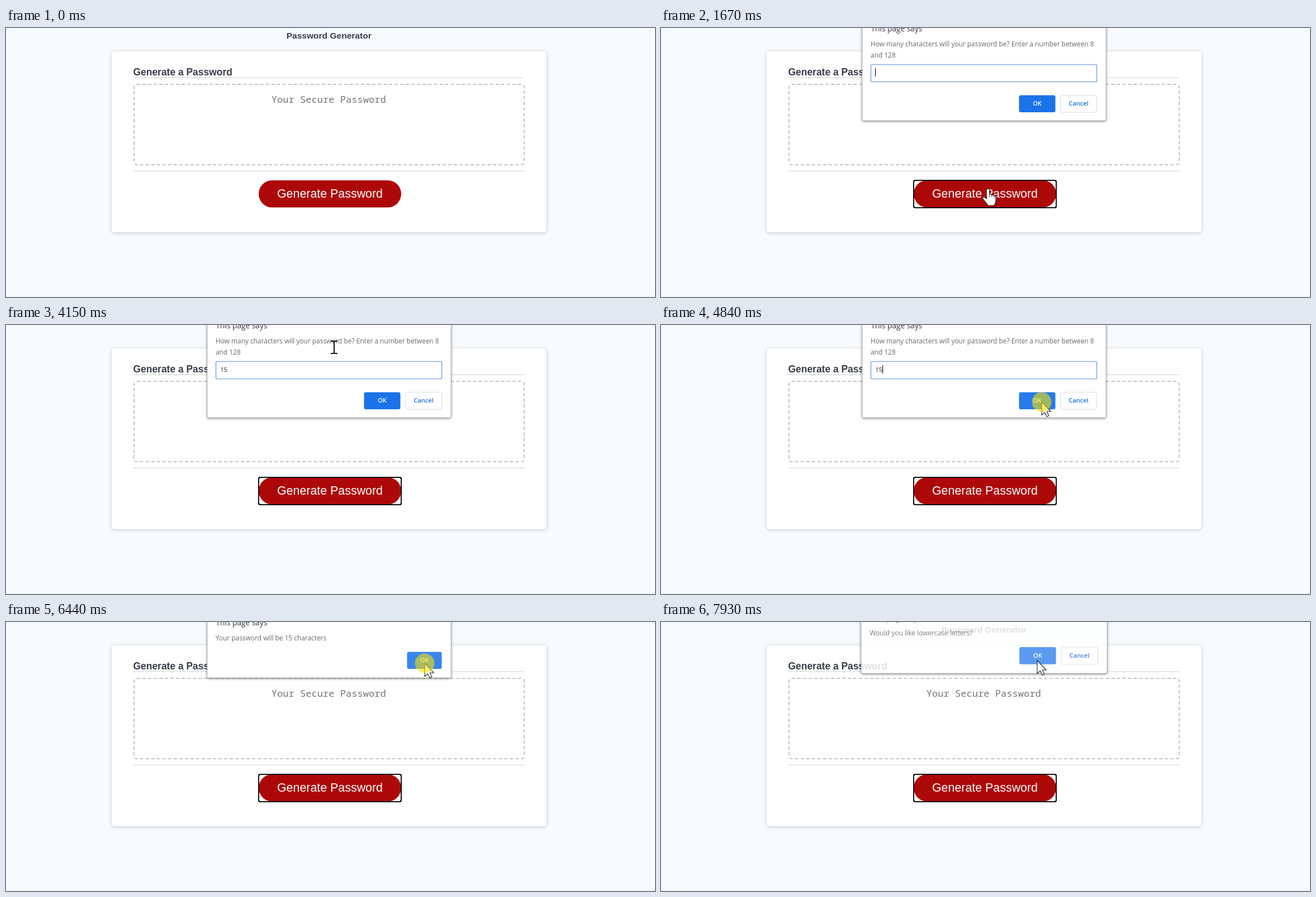
Recreate the animation shown at these times as an HTML page. Size 1161 by 482 pixels, loop 8 s.

```html
<!DOCTYPE html>
<html lang="en">
<head>
<meta charset="utf-8">
<title>Password Generator</title>
<style>
  html, body { margin: 0; width: 100%; height: 100%; overflow: hidden; }
  body { position: relative; background: #f8fbfe; font-family: "Liberation Sans", Arial, sans-serif; }
  .card {
    position: absolute; left: 189px; top: 42px; width: 778px; height: 324px;
    background: #fff; border-radius: 5px; box-shadow: 0 1px 6px rgba(0, 0, 0, .22);
  }
  .rule { position: absolute; left: 228px; width: 700px; height: 2px; background: #e6e7ea; }
  .field {
    position: absolute; left: 228px; top: 100px; width: 700px; height: 146px;
    box-sizing: border-box; border: 2px dashed #c3c4cc; border-radius: 6px;
  }
  .floor { position: absolute; left: 0; top: 481px; width: 100%; height: 1px; background: #eceef0; }
  svg { position: absolute; left: 0; top: 0; display: block; }
  .head { font-weight: bold; fill: #373d49; }
  .mono { font: 17.08px "Noto Sans Mono", "DejaVu Sans Mono", monospace; fill: #757575; }
  .ui { font: 11.9px "Open Sans", "Noto Sans", sans-serif; fill: #64686d; }
  .ui.title { font-size: 13.7px; fill: #35373a; }
  .ui.value { font-size: 10.8px; fill: #222; }
  .ui.label { font-size: 11px; font-weight: 600; text-anchor: middle; }
  .panel { fill: #fff; stroke: #b4b4b4; stroke-width: .8; filter: drop-shadow(0 1px 2px rgba(0, 0, 0, .5)); }
</style>
</head>
<body>
<div class="card"></div>
<div class="rule" style="top:88px"></div>
<div class="field"></div>
<div class="rule" style="top:255px"></div>
<div class="floor"></div>
<svg id="stage" width="1161" height="482" viewBox="0 0 1161 482">
  <text class="head" x="577.7" y="19" font-size="15.55" text-anchor="middle">Password Generator</text>
  <text class="head" x="227.5" y="85" font-size="17.45">Generate a Password</text>
  <text class="mono" x="474.8" y="134">Your Secure Password</text>
  <rect id="ring" x="452" y="273" width="255" height="49" rx="3" fill="#fff" stroke="#101010" stroke-width="2"/>
  <rect x="452" y="273" width="255" height="48.5" rx="24.2" fill="#ad0808"/>
  <text x="579.5" y="304" font-size="21.4" text-anchor="middle" fill="#fff">Generate Password</text>
  <rect id="edge" x="452" y="273" width="255" height="49" rx="3" fill="none" stroke="#101010" stroke-width="2"/>
  <g id="dialogs"></g>
  <g id="cursor" stroke-linejoin="round">
    <path id="arrow" d="M0 0V23.5L5.4 18.6L9 26.3L12.8 24.6L9.3 17H16.2Z" fill="#fff" stroke="#222" stroke-width="1.1"/>
    <g id="hand" fill="#fff" stroke="#222" stroke-width="1.2">
      <path d="M-2.6 2Q-2.4 0 0 0Q2.4 0 2.6 2V10Q6 8.8 7 11.3Q10 10.2 11 12.8Q14 12.3 14 15.5V21Q14 26 10.5 30H0Q-3 26 -6 22L-9.6 17.5Q-9 14 -6 15L-2.6 18Z"/>
      <path d="M2.6 10V15M7 11.3V15.5M11 12.8V16.5" stroke-width=".9"/>
    </g>
    <path id="beam" d="M-6 -11H-2Q0 -11 0 -9Q0 -11 2 -11H6M0 -9V9M-6 11H-2Q0 11 0 9Q0 11 2 11H6" fill="none" stroke="#111" stroke-width="2"/>
    <circle id="click" r="17.5" fill="#f0e10a"/>
  </g>
</svg>
<script>
const LOOP = 8000;
const $ = id => document.getElementById(id);
const show = (el, on) => el.setAttribute('visibility', on ? 'visible' : 'hidden');

const text = (cls, x, y, str, fill) =>
  `<text class="ui ${cls}" x="${x}" y="${y}"${fill ? ` style="fill:${fill}"` : ''}>${str}</text>`;

const button = (name, x, y, w) => {
  const ok = name === 'OK';
  return `<rect class="${name}" x="${x + .5}" y="${y + .5}" width="${w - 1}" height="30.5" rx="3" stroke="${ok ? 'none' : '#dadce0'}"/>`
    + text('label', x + w / 2, y + 19, name, ok ? '#fff' : '#1a6fd6');
};

// Each dialog hangs from the top edge of the stage.
const specs = {
  prompt: { h: 166, row: 120, ok: 640, cancel: true, idle: '#1a73e8', hover: '#267aec',
    lines: ['How many characters will your password be? Enter a number between 8', 'and 128'] },
  alert: { h: 100, row: 53, ok: 717, lines: ['Your password will be 15 characters'] },
  upper: { h: 100, row: 53, ok: 640, cancel: true, lines: ['Would you like uppercase letters?'] },
  lower: { h: 100, row: 53, ok: 640, cancel: true, lines: ['Would you like lowercase letters?'] }
};

$('dialogs').innerHTML = Object.entries(specs).map(([id, s]) => {
  s.okWidth = s.cancel ? 66 : 63;
  return `<g id="${id}"><rect class="panel" x="360" y="-40" width="436" height="${s.h + 40}" rx="2"/>`
    + text('title', 375.5, 6, 'This page says')
    + s.lines.map((l, i) => text('', 375, 33 + i * 19.5, l)).join('')
    + (id === 'prompt'
      ? '<rect x="375.5" y="65.5" width="404" height="31" rx="2" fill="#fff" stroke="#86aee6" stroke-width="1.7"/>'
        + '<text id="value" class="ui value" x="383.5" y="84"></text>'
        + '<rect id="caret" y="72" width="1.2" height="15" fill="#111"/>'
      : '')
    + button('OK', s.ok, s.row, s.okWidth)
    + (s.cancel ? button('Cancel', 714, s.row, 66) : '') + '</g>';
}).join('');

// Time, then the opacity of each dialog on view.
const scenes = [
  [0, {}],
  [1515, { prompt: .35 }], [1590, { prompt: .75 }], [1670, { prompt: 1 }],
  [4920, { prompt: .6 }], [5000, { prompt: .4, alert: .65 }], [5080, { alert: 1 }],
  [6530, { alert: .6 }], [6605, { alert: .4, upper: .65 }], [6680, { upper: 1 }],
  [7850, { upper: .6 }], [7930, { upper: .5, lower: .7 }]
];

const carets = [[0, 0], [1590, 383], [1980, 0], [2510, 383], [3060, 0], [3370, 390], [3520, 396], [4070, 0], [4600, 396]];
const values = [[0, ''], [3370, '1'], [3520, '15']];
const clicks = [[0, 0], [1360, .6], [1437, .3], [1515, 0], [4760, .6], [4920, .3], [5000, 0],
  [6300, .6], [6455, .3], [6530, 0], [7620, .6], [7775, .3], [7850, 0]];

const easeOut = u => 1 - (1 - u) ** 3;
const smooth = u => u * u * (3 - 2 * u);

// Start, end, number of steps, cubic path, easing.
const moves = [
  [280, 980, 9, [[1010, 442], [868, 391], [727, 340], [585, 288]], easeOut],
  [1980, 2360, 5, [[588, 297], [662, 223], [660, 138], [579, 48]], smooth],
  [4070, 4610, 7, [[579, 48], [620, -10], [770, 150], [681, 138]], smooth],
  [5540, 5920, 5, [[696, 118], [714, 104], [731, 88], [749, 74]], smooth],
  [7150, 7540, 5, [[749, 74], [723, 72], [698, 70], [673, 69]], smooth]
];

const at = (table, t) => table.filter(row => row[0] <= t).pop()[1];

function pointer(t) {
  const move = moves.filter(m => m[0] <= t).pop();
  if (!move) return null;
  const [start, end, n, [a, b, c, d], ease] = move;
  const step = Math.min(n, Math.floor((t - start) / (end - start) * n + .01));
  const u = ease(step / n), v = 1 - u;
  return [0, 1].map(i => v ** 3 * a[i] + 3 * v * v * u * b[i] + 3 * v * u * u * c[i] + u ** 3 * d[i]);
}

function pointerKind(t, [x, y]) {
  if (t < 1980) return x > 675 ? 'arrow' : 'hand';
  if (t < 5000) return y > 166 ? 'hand' : y < 100 ? 'beam' : 'arrow';
  return y > 100 ? 'hand' : 'arrow';
}

function drawDialogs(t, p) {
  const scene = at(scenes, t);
  for (const [id, s] of Object.entries(specs)) {
    const g = $(id), alpha = scene[id] || 0, settled = alpha === 1;
    show(g, alpha > 0);
    if (!alpha) continue;
    g.setAttribute('opacity', alpha);
    g.setAttribute('transform', settled ? '' : 'translate(-5.2 -9) scale(1.009)');
    const over = (x, w) => settled && p && p[0] >= x && p[0] <= x + w && p[1] >= s.row && p[1] <= s.row + 31;
    g.querySelector('.OK').setAttribute('fill', over(s.ok, s.okWidth) ? s.hover || '#3a85ec' : s.idle || '#428bee');
    if (s.cancel) g.querySelector('.Cancel').setAttribute('fill', over(714, 66) ? '#f8f9fb' : '#fff');
  }
  const x = at(carets, t);
  $('caret').setAttribute('x', x);
  $('caret').setAttribute('opacity', x ? 1 : 0);
  $('value').textContent = at(values, t);
}

function drawPointer(t, p) {
  $('cursor').style.display = p ? '' : 'none';
  if (!p) return;
  $('cursor').setAttribute('transform', `translate(${p.map(Math.round)})`);
  const kind = pointerKind(t, p);
  for (const id of ['arrow', 'hand', 'beam']) show($(id), id === kind);
  $('click').setAttribute('opacity', at(clicks, t));
}

function draw(t) {
  const p = pointer(t);
  show($('ring'), t >= 1360);
  show($('edge'), t >= 1360);
  drawDialogs(t, p);
  drawPointer(t, p);
}

const began = performance.now();
function frame() {
  draw((performance.now() - began) % LOOP);
  requestAnimationFrame(frame);
}
frame();
</script>
</body>
</html>
```
